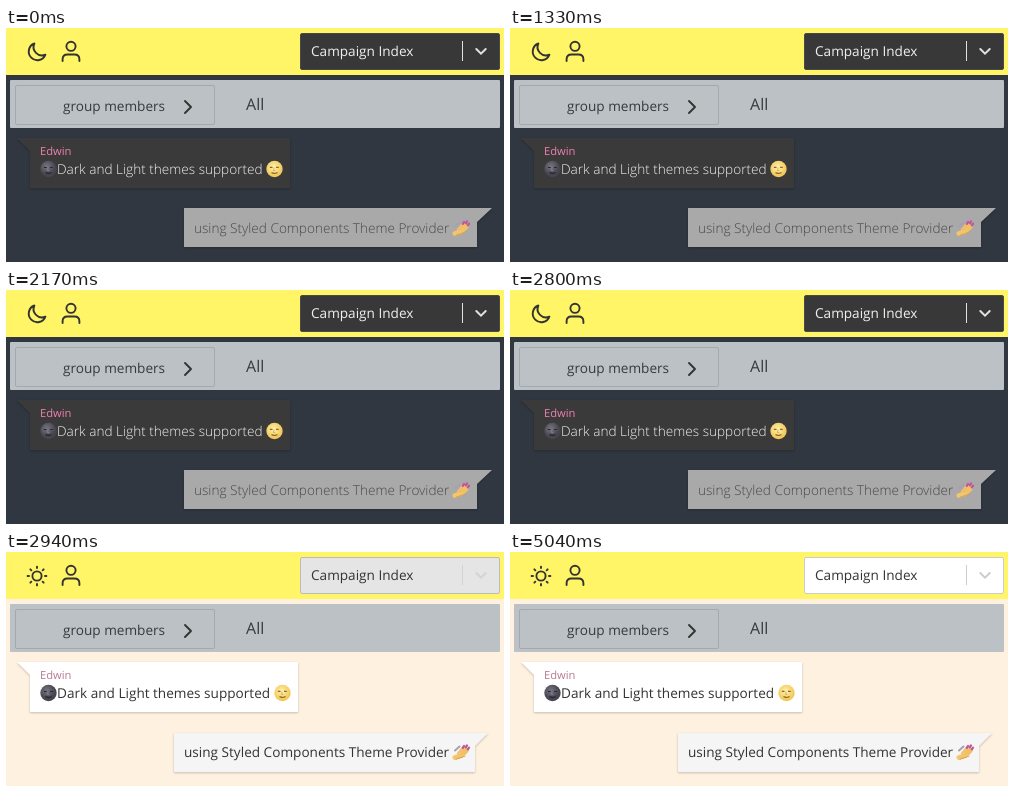
An HTML page for the animation above (5.53 s loop, 498 by 234 pixels).

```html
<!DOCTYPE html>
<html lang="en">
<head>
<meta charset="utf-8">
<title>Theme switch</title>
<style>
  html, body { margin: 0; width: 100%; height: 100%; overflow: hidden; }
  svg { display: block; width: 498px; height: 234px; }
  text { font: 13.6px "Open Sans", "Noto Sans", sans-serif; text-rendering: geometricPrecision; }
  .name { font-size: 11.2px; }
  .tab { font-size: 16px; }
  .thin { font-weight: 300; }
  .icon { fill: none; stroke: #333; stroke-width: 1.9; stroke-linecap: round; stroke-linejoin: round; }
  .shade { filter: drop-shadow(0 1px 1px rgba(0, 0, 0, .22)); }
</style>
</head>
<body>
<svg viewBox="0 0 498 234">
  <defs>
    <radialGradient id="night" cx=".4" cy=".35"><stop stop-color="#777580"/><stop offset="1" stop-color="#45444f"/></radialGradient>
    <radialGradient id="full" cx=".45" cy=".4"><stop stop-color="#fff3ae"/><stop offset="1" stop-color="#f3c95c"/></radialGradient>
    <g id="newMoon">
      <circle r="8.2" fill="url(#night)"/>
      <path d="M-4.5-1.5h2.6M1.6-1.5h2.6M-3 3.6Q0 5.4 3 3.4" fill="none" stroke="#24232b" stroke-width="1.2"/>
      <path d="M-.5-1.5L-1 1.5H.8" fill="none" stroke="#8a8891" stroke-width=".8"/>
    </g>
    <g id="fullMoon">
      <circle r="8.2" fill="url(#full)"/>
      <path d="M-4.6-1.6h2.6M1.6-1.6h2.6M-3 3.6Q0 5.4 3 3.4" fill="none" stroke="#86642b" stroke-width="1.2"/>
      <path d="M-.5-1.5L-1 1.5H.8" fill="none" stroke="#d3a447" stroke-width=".8"/>
    </g>
    <g id="polish" stroke-linecap="round" fill="none">
      <path d="M-7 5.5L-1 3.5L4-1" stroke="#f3c66b" stroke-width="5"/>
      <path d="M-4 1.5L1-4.5M-1 2L4-5M2 2L6-3" stroke="#f0bf68" stroke-width="2.2"/>
      <path d="M.8-4.2L2-6M3.8-4.6L5-6.6M5.8-2.6L7-4.4" stroke="#c1559a" stroke-width="2.2"/>
      <path d="M-7-1.5L-2.5-5.5" stroke="#a9a0b8" stroke-width="2"/>
      <path d="M-6 7.2L3 4.2" stroke="#d59b4d" stroke-width=".9"/>
    </g>
  </defs>

  <rect id="page" width="498" height="234"/>
  <rect width="498" height="47" fill="#fff566"/>
  <rect x="4" y="52" width="490" height="48" rx="1" fill="#bbc1c5"/>
  <rect x="9.5" y="57.5" width="199" height="39" rx="1.5" fill="none" stroke="#a3a9ad"/>
  <text x="57" y="83" fill="#363a3e">group members</text>
  <path class="icon" d="M179 73L185 79L179 85" stroke-width="2"/>
  <text class="tab" x="240" y="82" fill="#363a3e">All</text>

  <g class="icon">
    <circle cx="65" cy="18.3" r="4.6"/>
    <path d="M56.6 33V31.2Q56.6 26.5 61.5 26.5H68.5Q73.4 26.5 73.4 31.2V33"/>
  </g>

  <g id="dark">
    <path class="icon" d="M28.4 15.5A8.6 8.6 0 1 0 39.4 26.6A8.3 8.3 0 0 1 28.4 15.5Z"/>
    <path class="shade" d="M11 110H284V160H24V123Z" fill="#3a3a3a"/>
    <text class="name" x="34" y="127" fill="#ef80b0">Edwin</text>
    <use href="#newMoon" x="42.5" y="141"/>
    <text class="thin" x="51" y="146" fill="#f2f2f2">Dark and Light themes supported</text>
    <use href="#fullMoon" x="268.5" y="141"/>
    <path class="shade" d="M178 180H486L471 194V219H178Z" fill="#a9a9a9"/>
    <text class="thin" x="188" y="205" fill="#484848">using Styled Components Theme Provider</text>
    <use href="#polish" x="456" y="200"/>
  </g>

  <g id="light">
    <g class="icon">
      <circle cx="31" cy="24" r="4.6"/>
      <path id="rays"/>
    </g>
    <path class="shade" d="M11 110H292V160H24V123Z" fill="#fff"/>
    <text class="name" x="34" y="127" fill="#b87992">Edwin</text>
    <use href="#newMoon" x="42.5" y="141"/>
    <text x="51" y="146" fill="#333">Dark and Light themes supported</text>
    <use href="#fullMoon" x="276.5" y="141"/>
    <path class="shade" d="M168 181H482L469 194V220H168Z" fill="#f5f5f5"/>
    <text x="178" y="205" fill="#333">using Styled Components Theme Provider</text>
    <use href="#polish" x="456" y="200"/>
  </g>

  <rect id="box" x="294.5" y="5.5" width="199" height="36" rx="1.5"/>
  <text id="choice" x="305" y="28">Campaign Index</text>
  <path id="line" d="M456.5 13V33"/>
  <path id="arrow" d="M470.3 21L475 25.6L479.7 21" fill="none" stroke-width="2" stroke-linecap="round"/>
</svg>
<script>
const LOOP = 5530, SWITCH = 2870, STEP = 70;
const $ = id => document.getElementById(id);
const grey = (a, b, p) => {
  const v = Math.round(a + (b - a) * p);
  return `rgb(${v},${v},${v})`;
};
const easeOut = p => 1 - (1 - Math.min(1, Math.max(0, p))) ** 2;

let rays = "";
for (let i = 0; i < 8; i++) {
  const c = Math.cos(i * Math.PI / 4), s = Math.sin(i * Math.PI / 4);
  rays += `M${31 + 8 * c} ${24 + 8 * s}L${31 + 9.4 * c} ${24 + 9.4 * s}`;
}
$("rays").setAttribute("d", rays);

function draw(t) {
  const light = t >= SWITCH;
  const since = Math.floor((t - SWITCH) / STEP) * STEP;
  const box = easeOut(since / 110), mark = easeOut(since / 160);
  $("page").style.fill = light ? "#fff1e0" : "#303741";
  $("dark").style.display = light ? "none" : "";
  $("light").style.display = light ? "" : "none";
  $("box").style.fill = grey(56, 255, box);
  $("box").style.stroke = grey(72, 204, box);
  $("choice").style.fill = light ? "#333" : "#f0f0f0";
  $("line").style.stroke = $("arrow").style.stroke = grey(225, 204, mark);
}

const start = performance.now();
function tick() {
  draw((performance.now() - start) % LOOP);
  requestAnimationFrame(tick);
}
tick();
</script>
</body>
</html>
```
